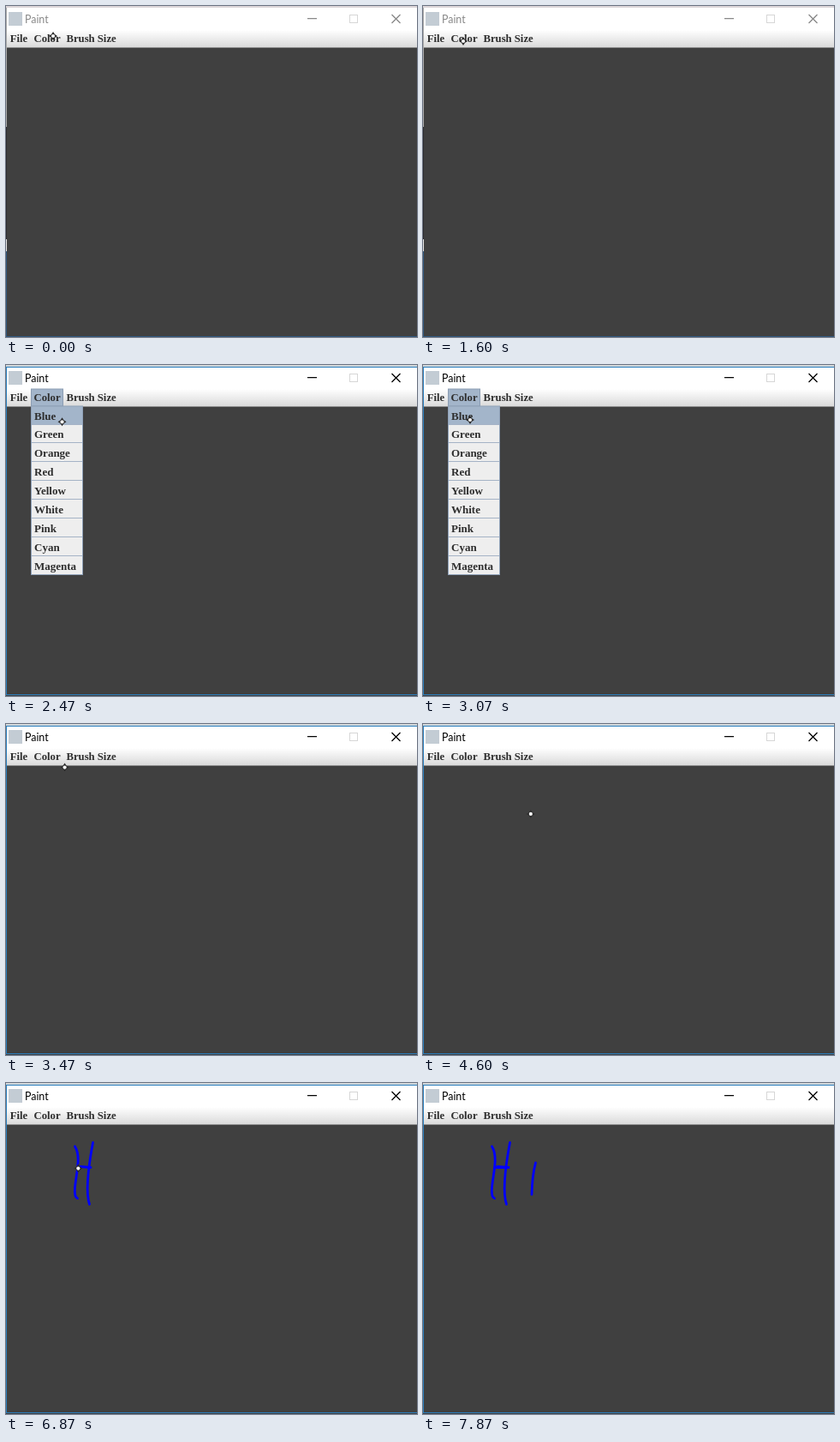
Animation, 480 px wide and 386 px high, one loop 8000 ms. Source, as an HTML page:

```html
<!DOCTYPE html>
<html lang="en">
<head>
<meta charset="utf-8">
<title>Drawing window</title>
<style>
  html, body { margin: 0; width: 100%; height: 100%; overflow: hidden; background: #404040; }
  svg { display: block; width: 480px; height: 386px; }
  text { fill: #2e2e2e; font: bold 12.7px "Liberation Serif", serif; }
  .item { font-size: 13px; }
  .title { fill: #000; font: 12.4px Lato, sans-serif; }
  .controls { fill: none; stroke: #000; stroke-width: 1.3; }
  .inactive .title { fill: #888; }
  .inactive .controls { stroke: #888; }
  .inactive .focus, .active .blur { display: none; }
  #paths { fill: none; stroke-width: 2.8; stroke-linecap: round; stroke-linejoin: round; }
</style>
</head>
<body>
<svg id="stage" class="inactive" viewBox="0 0 480 386">
  <defs>
    <linearGradient id="bar" x2="0" y2="1">
      <stop stop-color="#fff"/><stop offset="1" stop-color="#d9d9d9"/>
    </linearGradient>
  </defs>
  <rect width="480" height="386" fill="#404040"/>
  <rect width="480" height="28" fill="#fff"/>
  <rect y="28" width="480" height="20.5" fill="url(#bar)"/>

  <g class="focus">
    <rect width="480" height="2" fill="#d0d6da"/>
    <path d="M0 2.5H480M.5 2V385M0 384.5H480" stroke="#2b7fbd" fill="none"/>
  </g>
  <g class="blur">
    <rect width="480" height="2" fill="#dcd6d9"/>
    <path d="M.5 2V141" stroke="#a9a9a9"/>
    <path d="M.5 141V272" stroke="#2b2b30"/>
    <path d="M.5 272V286" stroke="#e4e4e4"/>
    <path d="M.5 286V386M0 385.5H480" stroke="#31587f"/>
  </g>

  <rect x="3" y="7" width="16" height="16" fill="#c3ccd4"/>
  <text class="title" x="22" y="20">Paint</text>
  <path class="controls" d="M352 14.7H363M450.5 10L460.5 20M460.5 10L450.5 20"/>
  <rect x="401.5" y="10.5" width="9" height="9" fill="none" stroke="#d6d6d6"/>

  <rect id="menuTab" x="29.5" y="28" width="37" height="20" fill="#a3b5ca" stroke="#8c9db3"/>
  <text x="4.7" y="42">File</text>
  <text x="32.5" y="42">Color</text>
  <text x="70.5" y="42">Brush Size</text>

  <g id="menu">
    <rect x="29.5" y="48" width="60" height="196.5" fill="#eee"/>
    <rect id="hover" x="30" y="48" width="59" height="21" fill="#a3b5ca"/>
    <g id="items"></g>
    <rect x="29.5" y="48" width="60" height="196.5" fill="none" stroke="#8fa1b8"/>
  </g>

  <g id="paths"></g>
  <g id="cursor">
    <path d="M0-5L2-2L5 0L2 2L0 5L-2 2L-5 0L-2-2Z" fill="#2c2c2c"/>
    <circle r="2.1" fill="#f4f4f4"/>
  </g>
</svg>
<script>
const LOOP = 8000, ACTIVATE = 1670, HOVER = 2130, PICK = 3130, CURSOR_END = 7600;
const SVG = "http://www.w3.org/2000/svg";
const colors = ["Blue", "Green", "Orange", "Red", "Yellow", "White", "Pink", "Cyan", "Magenta"];

const $ = id => document.getElementById(id);
const show = (el, on) => el.style.display = on ? "" : "none";
const easeOut = k => 1 - (1 - k) ** 3;

function gesture(from, to, d, ink = "none") {
  const path = document.createElementNS(SVG, "path");
  path.setAttribute("d", d);
  path.setAttribute("stroke", ink);
  $("paths").append(path);
  return { from, to, path, length: path.getTotalLength() };
}
const move = (from, to, d) => gesture(from, to, d);
const draw = (from, to, d) => gesture(from, to, d, "#00f");

// The pointer glides from the end of each gesture to the start of the next
const gestures = [
  move(0, 1330, "M55 35Q80 42 47 41"),
  move(1900, 3060, "M47 41L66 67Q90 60 55 64"),
  move(3270, 3530, "M55 64Q115 75 55 43"),
  move(4200, 4600, "M55 43Q150 130 126 105"),
  draw(5070, 5730, "M99 98.5L87 97.5L98 98.5L87 97.5"),
  draw(6030, 6330, "M80.5 74C88 86 82 105 80.5 122Q79.5 133 83.5 134.5"),
  draw(6600, 6730, "M101.5 69.5C98 88 92 125 97.5 141.5"),
  draw(6930, 7100, "M84 98.5H100"),
  draw(7290, 7530, "M131.5 93Q127.5 108 127 130")
];

$("items").innerHTML = colors.map((name, i) => {
  const y = 48 + 21.9 * i;
  return `<text class="item" x="33" y="${y + 15.5}">${name}</text>` +
    `<path d="M30 ${Math.round(y + 21.5) - .5}H89" stroke="#a5b3c6"/>`;
}).join("");

function pointerAt(time) {
  const next = gestures.findIndex(g => time < g.to);
  const g = gestures.at(next);
  const at = (g, k) => g.path.getPointAtLength(g.length * k);
  if (next < 0) return at(g, 1);
  if (time >= g.from) return at(g, (time - g.from) / (g.to - g.from));
  const last = gestures[next - 1], a = at(last, 1), b = at(g, 0);
  const k = easeOut((time - last.to) / (g.from - last.to));
  return { x: a.x + (b.x - a.x) * k, y: a.y + (b.y - a.y) * k };
}

function render(time) {
  const open = time >= ACTIVATE && time < PICK;
  $("stage").setAttribute("class", time < ACTIVATE ? "inactive" : "active");
  show($("menuTab"), open);
  show($("menu"), open);
  show($("hover"), time >= HOVER);
  show($("cursor"), time < CURSOR_END);

  for (const { from, to, path, length } of gestures) {
    const k = Math.min(1, (time - from) / (to - from));
    show(path, k > 0);
    path.setAttribute("stroke-dasharray", `${length * Math.max(0, k)} ${length + 9}`);
  }
  const { x, y } = pointerAt(time);
  $("cursor").setAttribute("transform", `translate(${x} ${y})`);
}

const start = performance.now();
function tick() {
  render((performance.now() - start) % LOOP);
  requestAnimationFrame(tick);
}
tick();
</script>
</body>
</html>
```
